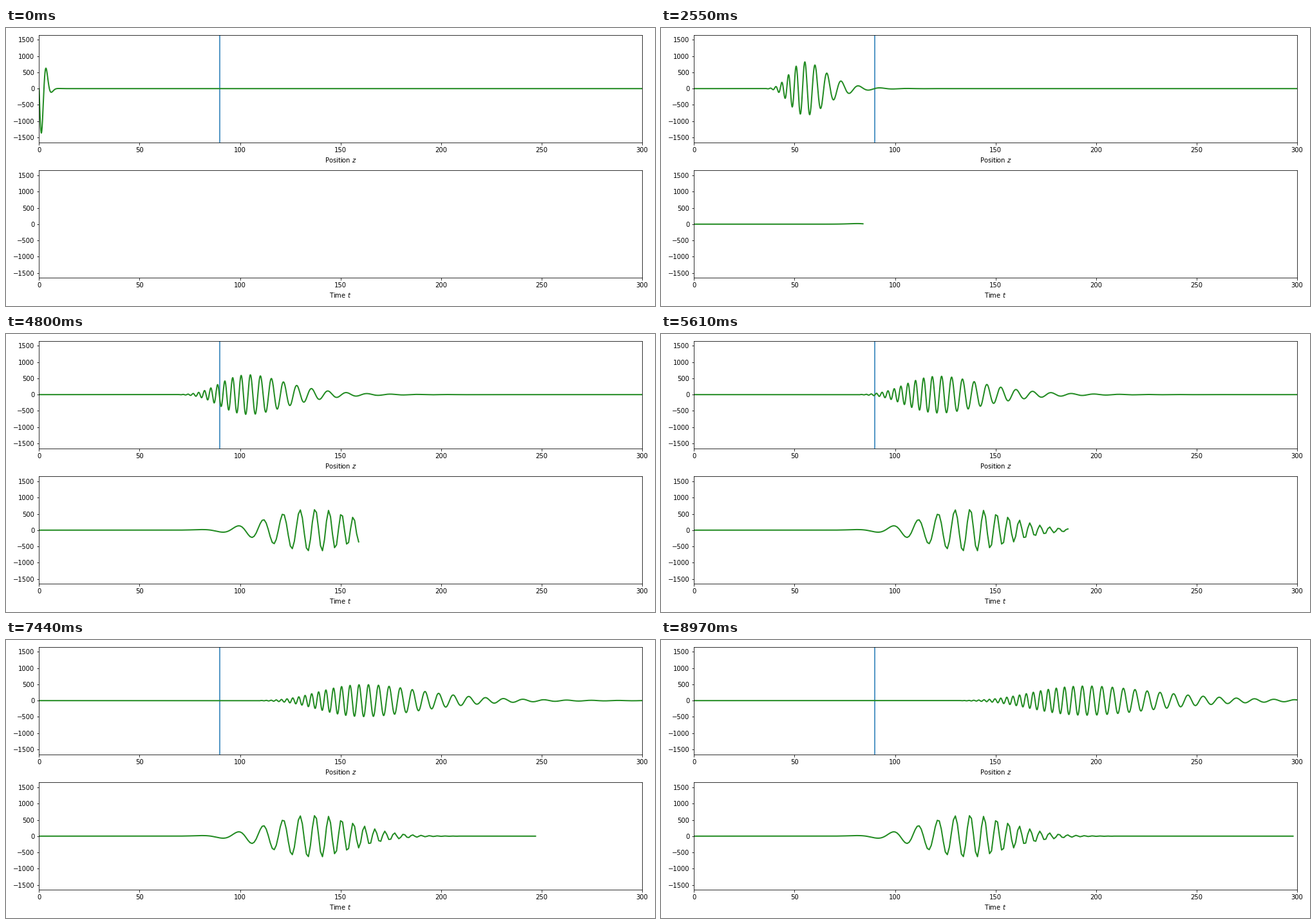
A matplotlib script that plays this animation: 1008x432 px, repeating every 9000 ms.

```python
import numpy as np
import matplotlib.pyplot as plt
from matplotlib.animation import FuncAnimation

FRAMES = 300
LENGTH = 300
AMP = 1500
PROBE = 90          # position of the observer

# Gaussian pulse in a medium with quadratic dispersion
TAU = 4.0           # initial pulse duration
W0 = 0.869          # carrier frequency
K0 = 1.301          # carrier wave number
K1 = 1.515          # inverse group velocity
K2 = 0.91           # group velocity dispersion


def field(z, t):
    q = 1 + 1j * K2 * z / TAU**2
    delay = t - K1 * z
    envelope = np.exp(-delay**2 / (2 * TAU**2 * q)) / np.sqrt(q)
    return AMP * np.imag(envelope * np.exp(1j * (W0 * t - K0 * z)))


z = np.linspace(0, LENGTH, 6001)
times = np.arange(FRAMES)
signal = field(PROBE, times)

fig, (top, bottom) = plt.subplots(2, 1, figsize=(14, 6), dpi=72)
for ax, label in ((top, "Position $z$"), (bottom, "Time $t$")):
    ax.set_xlim(0, LENGTH)
    ax.set_ylim(-1.1 * AMP, 1.1 * AMP)
    ax.set_xlabel(label)

top.axvline(PROBE)
wave, = top.plot([], [], color="forestgreen", lw=2)
trace, = bottom.plot([], [], color="forestgreen", lw=2)
fig.tight_layout()


def update(n):
    wave.set_data(z, field(z, n))
    trace.set_data(times[:n], signal[:n])
    return wave, trace


anim = FuncAnimation(fig, update, frames=FRAMES, interval=30,
                     repeat=True, repeat_delay=0)
plt.show()
```
